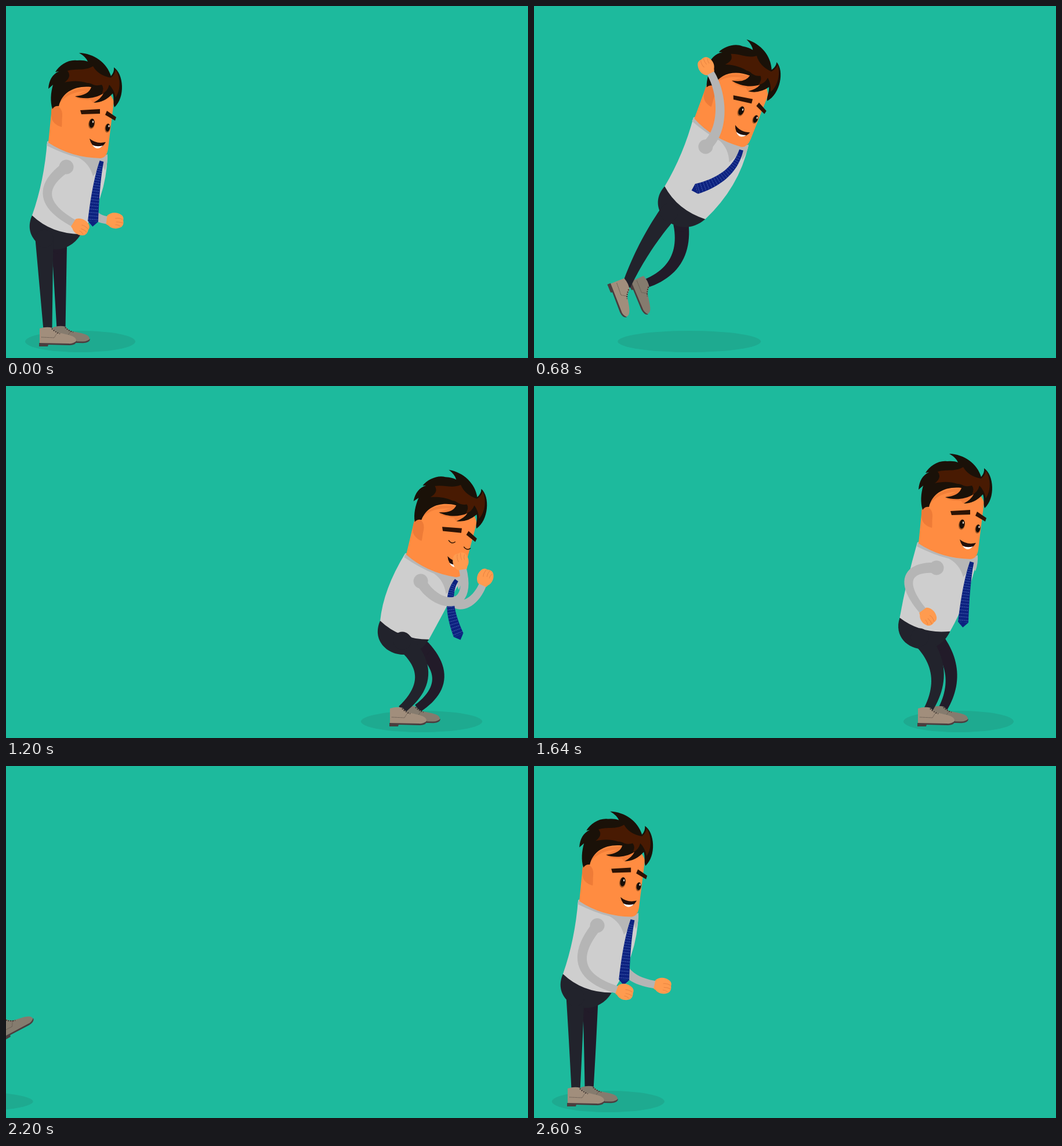
Animation, 900 px wide and 608 px high, one loop 2.64 s. Source, as an HTML page with a canvas:

```html
<!DOCTYPE html>
<html lang="en">
<head>
<meta charset="utf-8">
<title>Jumping man</title>
<style>
  html, body { margin: 0; width: 100%; height: 100%; overflow: hidden; background: #1dba9d; }
  canvas { display: block; }
</style>
</head>
<body>
<canvas id="stage" width="900" height="608"></canvas>
<script>
const ctx = document.getElementById('stage').getContext('2d');
const JUMP = 1320, STRIDE = 604, STEP = 40;
const RAD = Math.PI / 180;

const ramp = (t, from, to) => Math.min(1, Math.max(0, (t - from) / (to - from)));
const smooth = (t, from, to) => { const u = ramp(t, from, to); return u * u * (3 - 2 * u); };
const smoother = u => u ** 3 * (u * (6 * u - 15) + 10);
const bump = (t, from, full, fade, to) => smooth(t, from, full) * (1 - smooth(t, fade, to));

const mix = (a, b, k) => a.map((v, i) => v + (b[i] - v) * k);
const add = (a, b, k = 1) => [a[0] + b[0] * k, a[1] + b[1] * k];
function place([x, y, tilt], lx, ly) {
  const c = Math.cos(tilt * RAD), s = Math.sin(tilt * RAD);
  return [x + lx * c - ly * s, y + lx * s + ly * c];
}

// Arm shapes: two curve handles and the wrist, measured from the neck.
const nearArm = {
  rest: [-68, 62, -63, 95, -6, 126],
  back: [-73, -12, -110, 8, -79, 81],
  guard: [0, 69, 70, 84, 49, 1],
  up: [8, -7, 3, -72, -19, -107]
};
const farArm = {
  rest: [5, 95, 25, 118, 52, 120],
  back: [0, 70, -10, 100, -45, 85],
  guard: [38, 84, 72, 62, 84, 29],
  up: [30, 0, 30, -50, 20, -90]
};

// A foot tips onto its toe, swings through the air and comes down heel first.
function flyingFoot(t, x, y, from, to) {
  const u = ramp(t, from, to), s = Math.sin(2 * Math.PI * u);
  const lift = 95 * Math.sin(Math.PI * u) - 36 * Math.min(0, s);
  return [x + STRIDE * smoother(u), y - lift, s * (s > 0 ? 70 : 31)];
}

function poseAt(t) {
  const windup = bump(t, 200, 440, 490, 580);
  const lean = bump(t, 480, 640, 700, 890);
  const landing = bump(t, 1000, 1130, 1190, 1285);
  const settle = bump(t, 1200, 1270, 1280, JUMP);
  const guard = bump(t, 460, 560, 1195, 1275);
  const raise = bump(t, 540, 670, 740, 960);
  const arc = 70 * Math.sin(Math.PI * ramp(t, 620, 1060));

  const neck = [
    124 - 28 * windup + 88 * lean + 11 * landing + 5 * settle + STRIDE * smooth(t, 500, 1160),
    250 + 72 * windup + 64 * landing - 3 * settle - arc,
    14.5 * lean + 8 * landing
  ];
  const hip = [
    neck[0] - 37 - 6 * windup - 25 * lean - 15 * landing,
    neck[1] + 128 - 4 * windup - 9 * lean - 19 * landing,
    21 - 12 * windup + 18 * lean
  ];
  const arm = a => mix(mix(mix(a.rest, a.back, windup - 0.3 * settle), a.guard, guard), a.up, raise);

  return {
    neck, hip,
    crouch: windup + 0.9 * landing,
    asleep: landing > 0.5,
    spine: 8 - 25 * (windup + landing),
    nearKnee: 92 * windup + 70 * landing - 10 * lean,
    farKnee: 72 * windup + 64 * landing + 48 * lean,
    nearFoot: flyingFoot(t, 70, 556, 500, 1120),
    farFoot: flyingFoot(t, 93, 554, 525, 1035),
    nearArm: arm(nearArm),
    farArm: arm(farArm),
    tieBend: [31 - 10 * lean - 16 * landing, 55 + 22 * lean],
    tieEnd: [26 - 68 * lean + 16 * landing, 122 - 27 * lean - 4 * landing],
    shadowX: 128 + STRIDE * smooth(t, 460, 1165) - 16 * landing,
    shadowWidth: 95 + 40 * bump(t, 500, 780, 900, 1340)
  };
}

function fill(d, color) {
  ctx.fillStyle = color;
  ctx.fill(new Path2D(d));
}
function line(d, color, width, dash = []) {
  ctx.strokeStyle = color;
  ctx.lineWidth = width;
  ctx.setLineDash(dash);
  ctx.stroke(new Path2D(d));
  ctx.setLineDash([]);
}
function ellipse(x, y, rx, ry, color, tilt = 0) {
  ctx.fillStyle = color;
  ctx.beginPath();
  ctx.ellipse(x, y, rx, ry, tilt, 0, 7);
  ctx.fill();
}
function within([x, y, tilt], draw) {
  ctx.save();
  ctx.translate(x, y);
  ctx.rotate(tilt * RAD);
  draw();
  ctx.restore();
}

// Point and unit normal on a cubic curve.
function onCurve([a, b, c, d], t) {
  const ab = mix(a, b, t), bc = mix(b, c, t), cd = mix(c, d, t);
  const p = mix(ab, bc, t), q = mix(bc, cd, t);
  const dx = q[0] - p[0], dy = q[1] - p[1], len = Math.hypot(dx, dy) || 1;
  return { at: mix(p, q, t), normal: [-dy / len, dx / len] };
}
const quad = (a, c, b) => [a, mix(a, c, 2 / 3), mix(b, c, 2 / 3), b];

function ribbon(curve, w0, w1, color, cap = 0) {
  const left = [], right = [];
  for (let i = 0; i <= 24; i++) {
    const { at, normal } = onCurve(curve, i / 24), w = (w0 + (w1 - w0) * i / 24) / 2;
    left.push(add(at, normal, w));
    right.unshift(add(at, normal, -w));
  }
  ctx.fillStyle = color;
  ctx.beginPath();
  [...left, ...right].forEach(p => ctx.lineTo(...p));
  ctx.fill();
  if (cap) ellipse(...curve[0], cap, cap, color);
}

function drawLeg(top, ankle, bend, width, color) {
  const dx = ankle[0] - top[0], dy = ankle[1] - top[1], len = Math.hypot(dx, dy);
  const knee = add(mix(top, ankle, 0.5), [dy / len, -dx / len], bend);
  ribbon(quad(top, knee, ankle), width, 15, color, width / 2);
}

function drawShoe(foot, color, height) {
  within(foot, () => {
    ctx.scale(1, height);
    fill('M-12 1Q0 -3 10 0C14 5 18 8 24 9C38 12 51 14 51 22C51 27 48 28 44 28L-12 28Z', color);
    fill('M-13 26V32H2L3 29L40 30Q52 29 52 22Q46 28 38 27Z', '#4a3e3f');
    line('M-9 16L13 17L18 9', '#5d5249', 1, [1.5, 1]);
    line('M9 1Q14 7 23 10', '#3b3330', 2, [2, 2]);
  });
}

function drawArm(shoulder, neck, values, cap) {
  const [c1, c2, wrist] = [0, 2, 4].map(i => add(neck, [values[i], values[i + 1]]));
  ribbon([shoulder, c1, c2, wrist], 18, 13, '#b5b5b5', cap);
  const angle = Math.atan2(wrist[1] - c2[1], wrist[0] - c2[0]);
  within([...wrist, angle / RAD], () => {
    fill('M-2 -8C4 -15 14 -15 20 -12C25 -10 27 -6 26 -2C28 4 26 9 22 11C15 15 6 14 1 9L-3 7Z', '#ff9b4f');
    line('M12 -4Q18 -6 25 -3M14 2Q20 1 26 3M13 7Q17 6 22 9', '#e88442', 1);
  });
}

function drawTorso(neck, hip, curve) {
  const nl = place(neck, -53, -16), nr = place(neck, 51, 8);
  const hl = place(hip, -45, 0), hr = place(hip, 45, 0);
  ctx.fillStyle = '#22232c';
  ctx.beginPath();
  ctx.moveTo(...hl);
  ctx.bezierCurveTo(...place(hip, -48, 56), ...place(hip, 34, 60), ...hr);
  ctx.fill();
  ctx.fillStyle = '#cecece';
  ctx.beginPath();
  ctx.moveTo(...nl);
  ctx.quadraticCurveTo(...add(mix(nl, hl, 0.5), [curve, 4]), ...hl);
  ctx.quadraticCurveTo(...place(hip, -2, 18), ...hr);
  ctx.quadraticCurveTo(...add(mix(nr, hr, 0.5), [curve + 13, 8]), ...nr);
  ctx.fill();
}

function drawTie(neck, bend, tip) {
  const end = add(neck, tip);
  const curve = quad(place(neck, 41, 18), add(neck, bend), end);
  ribbon(curve, 7, 18, '#0d2280');
  const { normal: n } = onCurve(curve, 1);
  ctx.beginPath();
  ctx.moveTo(...add(end, n, 9));
  ctx.lineTo(...add(end, [n[1], -n[0]], 9));
  ctx.lineTo(...add(end, n, -9));
  ctx.fill();
  ctx.strokeStyle = '#4a66b4';
  ctx.lineWidth = 1;
  ctx.setLineDash([2, 1]);
  for (let t = 0.12; t <= 1; t += 0.045) {
    const { at, normal } = onCurve(curve, t), w = 2.5 + 6 * t;
    ctx.beginPath();
    ctx.moveTo(...add(at, normal, w));
    ctx.lineTo(...add(at, normal, -w));
    ctx.stroke();
  }
  ctx.setLineDash([]);
}

function drawCollar() {
  fill('M72 233L70 241Q100 256 125 262Q144 272 150 294Q159 284 165 268Q168 280 171 284Q176 270 175 256L168 260Q110 255 72 233Z', '#b7b7b7');
}

function drawEye(x, y, size, asleep) {
  if (asleep) return line(`M${x - 6} ${y - 1}q6 7 12 1`, '#2c1305', 1.5);
  ellipse(x - 0.5, y + 1, 5.5 * size, 9 * size, '#a65a25', 0.15);
  ellipse(x, y, 4.4 * size, 7.8 * size, '#160d07', 0.15);
  ellipse(x + 2, y - 2.5, 1.2, 2, '#e8d8c8');
}

function drawHead(asleep) {
  fill('M80 165L73 236Q112 262 163 263Q174 262 176 246L186 165Q175 135 140 135Q95 135 80 165Z', '#ff8c41');
  fill('M92 168Q102 142 146 141L176 150Q168 168 150 167L146 162Q124 163 119 156Q128 150 138 147Q108 148 92 168Z', '#f27f38');
  fill('M82 174C90 170 98 178 97 190C96 200 97 205 96 209C86 206 78 200 78 188C78 182 78 176 82 174Z', '#ee7b37');
  // Hair: crown with its spikes, then the fringe.
  fill('M80 178C76 165 77 150 81 136L73 143C74 128 80 118 91 113L85 114C92 102 108 92 122 94Q134 93 141 96Q138 88 126 81C152 82 174 98 181 121Q187 114 186 106C203 117 206 158 187 175C184 168 187 160 184 151Q170 167 151 167Q164 160 168 151C152 161 132 161 119 156Q143 154 147 140C120 137 97 148 91 173Q84 172 80 178Z', '#1a1108');
  fill('M101 132Q114 122 106 112C122 107 135 113 150 104Q159 120 181 124Q188 118 189 110C198 125 198 145 189 158Q186 144 178 136Q175 148 165 152Q170 142 165 136C150 140 148 132 140 133C125 128 110 130 101 132Z', '#481a02');
  fill('M128 180L162 178V186L130 187Z M174 181L190 192L188 198L171 188Z', '#2c1305');
  drawEye(148, 202.5, 1, asleep);
  drawEye(175.5, 210, 0.86, asleep);
  fill('M144 229Q156 239 172 235Q166 246 157 245Q147 242 144 229Z', '#24100a');
  fill('M149 240Q157 244 167 241Q163 246 157 246Q152 245 149 240Z', '#fff');
}

function drawMan(t, offset) {
  const pose = poseAt(t), { neck, hip, nearFoot, farFoot, crouch } = pose;
  const onHead = draw => within(neck, () => { ctx.translate(-124, -250); draw(); });

  ctx.save();
  ctx.translate(offset, 0);
  ellipse(pose.shadowX, 579.5, pose.shadowWidth, 18.5, '#1eaa90');
  drawArm(place(neck, 25, 40), neck, pose.farArm, 8);
  drawLeg(place(hip, 18 + 26 * crouch, 33 - 18 * crouch), place(farFoot, 2 + 12 * crouch, 3),
    pose.farKnee, 26, '#221b29');
  drawShoe(farFoot, '#857b6e', 0.94);
  drawTorso(neck, hip, pose.spine);
  drawLeg(place(hip, -11 + 16 * crouch, 30 - 13 * crouch), place(nearFoot, 2 + 7 * crouch, 3),
    pose.nearKnee, 31, '#22232c');
  drawShoe(nearFoot, '#a18e7c', 1);
  onHead(drawCollar);
  drawTie(neck, pose.tieBend, pose.tieEnd);
  onHead(() => drawHead(pose.asleep));
  drawArm(place(neck, -20, 28), neck, pose.nearArm, 12.5);
  ctx.restore();
}

function render(now) {
  const t = Math.floor(now / STEP) * STEP % (2 * JUMP);
  ctx.fillStyle = '#1dba9d';
  ctx.fillRect(0, 0, 900, 608);
  if (t < JUMP) {
    drawMan(t, 0);
  } else {
    // The second jump leaves on the right and comes back in on the left.
    drawMan(t - JUMP, STRIDE);
    drawMan(t - JUMP, -STRIDE);
  }
}

const start = performance.now();
function loop() {
  render(performance.now() - start);
  requestAnimationFrame(loop);
}
loop();
</script>
</body>
</html>
```
